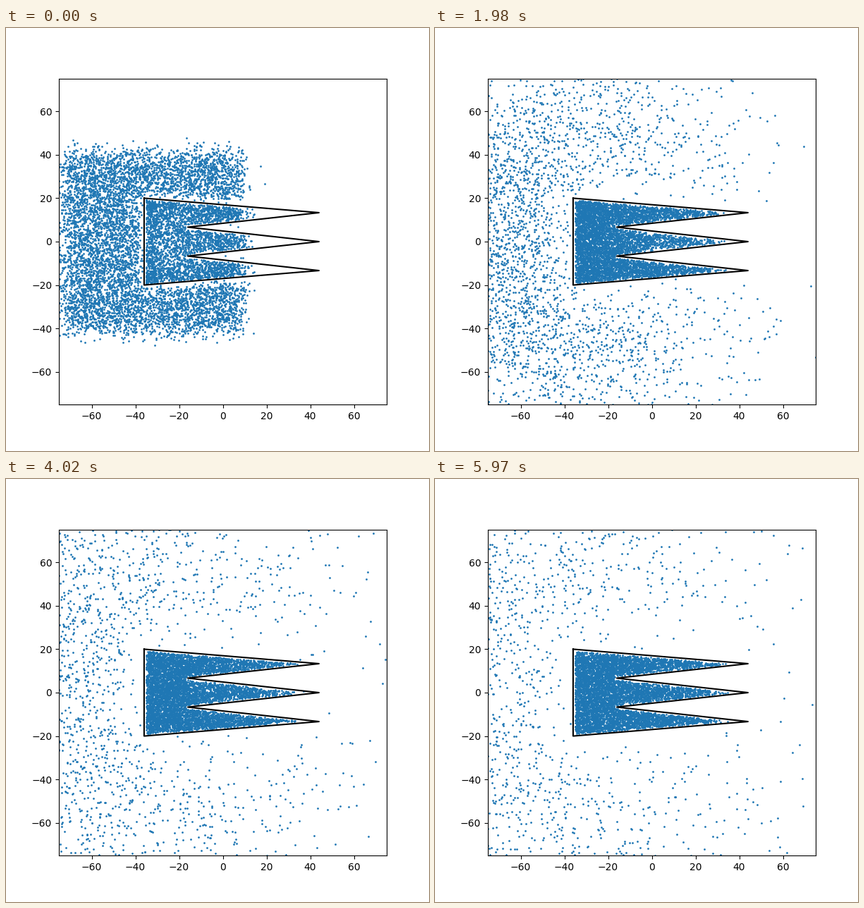
A matplotlib script that plays this animation: 600 by 600 pixels, repeating every 6000 ms.

```python
import matplotlib.pyplot as plt
import numpy as np
from matplotlib.animation import FuncAnimation

FRAMES = 200
SUBSTEPS = 10
STEP = 1.1
RETRIES = 4
COUNT = 10000
MARGIN = 0.85
NOTCH = 20 / 3

rng = np.random.default_rng(4)


def depth(x, y):
    """Approximate signed distance into the comb, positive inside."""
    a = np.abs(y)
    side = 20 - a - (x + 36) / 12
    tooth = np.maximum(np.abs(a - NOTCH) - (x + 16) / 9, -16 - x)
    return np.minimum(x + 36, np.minimum(side, tooth))


def push_in(x, y):
    """Move points just behind the walls they have crossed."""
    x = np.maximum(x, -36 + MARGIN)
    a = np.minimum(np.abs(y), 20 - MARGIN - (x + 36) / 12)
    off = a - NOTCH
    gap = np.maximum(np.abs(off), (x + 16) / 9 + MARGIN)
    gap = np.where(x > -16 - MARGIN, gap, np.abs(off))
    a = NOTCH + np.where(off < 0, -gap, gap)
    return x, np.copysign(a, y)


def capture(x, y, trapped):
    new = ~trapped & (depth(x, y) > -MARGIN) & (x < 35)
    x[new], y[new] = push_in(x[new], y[new])
    trapped |= new


def move(x, y, trapped):
    """Random step; trapped points retry steps that would leave the comb."""
    nx, ny = x.copy(), y.copy()
    todo = np.arange(COUNT)
    for _ in range(RETRIES):
        nx[todo] = x[todo] + rng.normal(0, STEP, todo.size)
        ny[todo] = y[todo] + rng.normal(0, STEP, todo.size)
        todo = todo[trapped[todo] & (depth(nx[todo], ny[todo]) < MARGIN)]
    nx[todo], ny[todo] = x[todo], y[todo]
    return nx, ny


def simulate():
    x = rng.uniform(-72, 8, COUNT)
    y = rng.uniform(-40, 40, COUNT)
    trapped = np.zeros(COUNT, bool)
    capture(x, y, trapped)
    states = []
    for _ in range(FRAMES):
        for _ in range(SUBSTEPS):
            x, y = move(x, y, trapped)
            capture(x, y, trapped)
        states.append((x, y))
    return states


states = simulate()

fig, ax = plt.subplots(figsize=(6, 6), dpi=100)
ax.set_xlim(-75, 75)
ax.set_ylim(-75, 75)
dots, = ax.plot([], [], "o", ms=1, color="tab:blue")
ax.plot([-36, 44, -16, 44, -16, 44, -36, -36],
        [20, 2 * NOTCH, NOTCH, 0, -NOTCH, -2 * NOTCH, -20, 20], color="black")


def draw(i):
    dots.set_data(*states[i])
    return dots,


anim = FuncAnimation(fig, draw, frames=FRAMES, interval=30, repeat=True,
                     repeat_delay=0)
plt.show()
```
